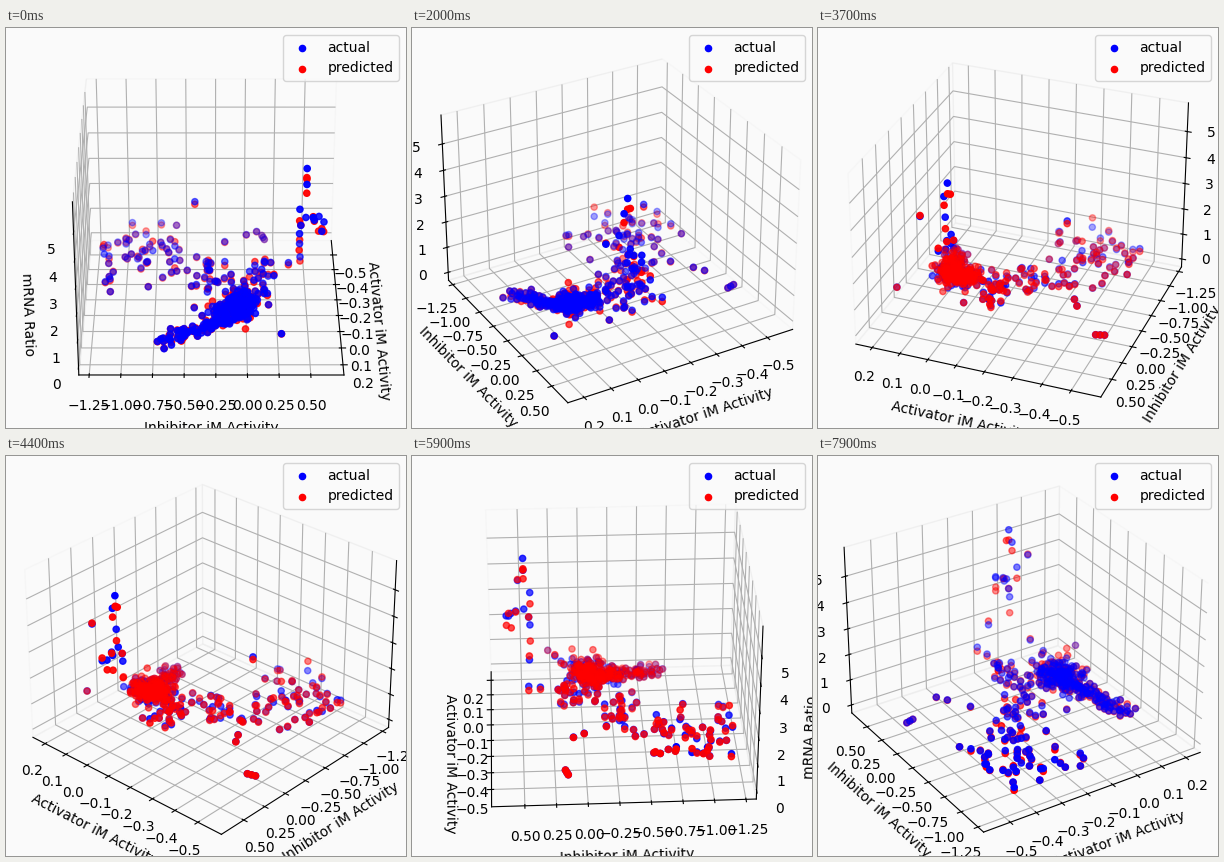
Write a matplotlib script that moves like this. It is 400 by 400 pixels and loops after 8000 ms.

```python
import numpy as np
import matplotlib.pyplot as plt
from matplotlib.animation import FuncAnimation

FRAMES, STEP = 80, 3
BG = "#fafafa"
plt.rcParams.update({"figure.facecolor": BG, "axes.facecolor": BG})

rng = np.random.default_rng(7)


# Each group returns activator, inhibitor and measured ratio.
def core(n):
    y = rng.normal(-0.06, 0.1, n)
    x = 0.04 - 0.1 * (y + 0.06) + rng.normal(0, 0.04, n)
    return x, y, np.exp(1.5 * y) * rng.uniform(0.75, 1.15, n)


def tail(n):
    y = -0.15 - 0.6 * rng.beta(1.1, 1.6, n)
    x = 0.07 - 0.145 * (y + 0.2) + rng.normal(0, 0.02, n)
    return x, y, 0.75 * np.exp(2 * y) + rng.uniform(0, 0.15, n)


def halo(n):
    y = np.clip(rng.normal(0.05, 0.24, n), -0.5, 0.55)
    x = rng.uniform(-0.17, 0.06, n)
    return x, y, rng.uniform(0.4, 1.1, n) + np.clip(y + 0.1, 0, 1) * rng.uniform(0, 3, n)


def middle(n):
    return rng.normal(-0.24, 0.05, n), rng.normal(-0.3, 0.12, n), rng.uniform(0.1, 1.2, n)


def sparse(n):
    x = np.clip(rng.normal(-0.32, 0.085, n), -0.5, -0.17)
    return x, rng.uniform(-1.2, -0.55, n), rng.uniform(0.1, 1.1, n)


def peak(n):
    y = rng.uniform(0.4, 0.62, n)
    return 0.12 - 0.3 * y + rng.normal(0, 0.04, n), y, rng.uniform(3.1, 4.4, n)


cloud = np.hstack([core(130), tail(65), halo(45), middle(18), sparse(45), peak(9)])
trio = [np.linspace(-0.497, -0.525, 3), np.linspace(0.17, 0.15, 3), np.full(3, 0.33)]
loners = np.transpose([(-0.03, 0.466, 5.68), (-0.017, 0.466, 5.17), (-0.306, -0.422, 2.92),
                       (0.197, 0.268, 0.86), (-0.398, 0.01, 1.1), (-0.42, 0.098, 1.1)])
x, y, actual = np.hstack([cloud, trio, loners])

# The model underestimates high ratios; its error grows with the ratio.
error = rng.laplace(0, 0.1, x.size) * actual
error[cloud.shape[1]:] = 0
predicted = actual - 0.012 * actual**2 + error

fig = plt.figure(figsize=(4, 4), dpi=100)
ax = fig.add_axes((0, 0, 1, 1), projection="3d", computed_zorder=False)
blue = ax.scatter(x, y, actual, c="blue", label="actual")
red = ax.scatter(x, y, predicted, c="red", label="predicted")

ax.set(xlim=(-0.601, 0.2595), ylim=(-1.332, 0.762), zlim=(-0.32, 6.08),
       xlabel="Activator iM Activity", ylabel="Inhibitor iM Activity",
       zlabel="mRNA Ratio")
ax.set_xticks(np.arange(-5, 3) / 10)
ax.set_yticks(np.arange(-5, 3) / 4)
ax.set_zticks(range(6))
for axis in (ax.xaxis, ax.yaxis, ax.zaxis):
    axis.pane.set_fill(False)
ax.legend(loc="upper right")


def update(i):
    # the tiny offset keeps the left pane at the back when facing head-on
    azim = STEP * i + 0.01
    ax.view_init(elev=30, azim=azim)
    # the set holding the nearest point is drawn on top
    blue.set_zorder(2)
    red.set_zorder(3 if 108 <= azim < 186 else 1)
    return blue, red


anim = FuncAnimation(fig, update, frames=FRAMES, interval=100, repeat=True)
plt.show()
```
